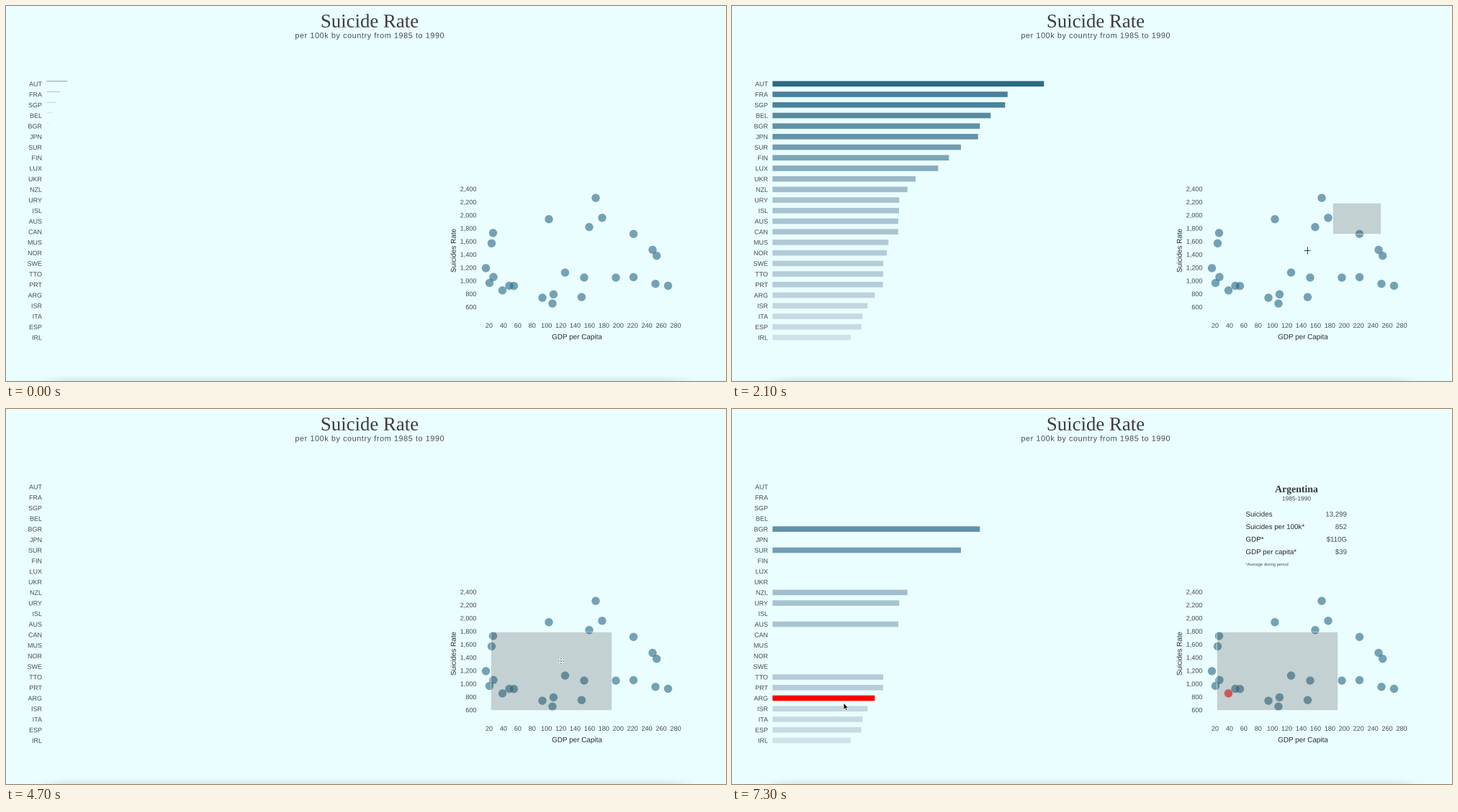
These frames come from a looping animation (1000 px wide and 522 px high, 7400 ms). A matplotlib script:

```python
import numpy as np
import matplotlib.pyplot as plt
from matplotlib.animation import FuncAnimation
from matplotlib.patches import Circle, PathPatch, Rectangle
from matplotlib.path import Path
from matplotlib.textpath import TextPath
from matplotlib.transforms import Affine2D

W, H = 1000, 522
FRAMES, STEP = 74, 100
BG = "#ebfeff"
INK = "#444b4d"
SANS, SERIF = "Liberation Sans", "Liberation Serif"
DEEP = np.array([42, 106, 135]) / 255
PALE = np.array([209, 225, 233]) / 255

# code, GDP per capita, rate
DATA = [
    ("AUT", 168.6, 2262), ("FRA", 177.6, 1959), ("SGP", 103.3, 1938),
    ("BEL", 159.5, 1818), ("BGR", 25.5, 1728), ("JPN", 221.3, 1713),
    ("SUR", 23.5, 1570), ("FIN", 247.9, 1470), ("LUX", 253.6, 1380),
    ("UKR", 15.5, 1192), ("NZL", 125.9, 1124), ("URY", 26, 1056),
    ("ISL", 221.3, 1054), ("AUS", 152.5, 1048), ("CAN", 196.7, 1047),
    ("MUS", 20.5, 966), ("NOR", 251.9, 952), ("SWE", 269.5, 923),
    ("TTO", 48.1, 922), ("PRT", 54.6, 920), ("ARG", 38.6, 852),
    ("ISR", 109.8, 792), ("ITA", 149, 750), ("ESP", 94.3, 740),
    ("IRL", 108.3, 652),
]
DETAILS = {
    "TTO": ("Trinidad and Tobago", "759", "922", "$5.1G", "$48"),
    "PRT": ("Portugal", "5,462", "920", "$51G", "$54"),
    "ARG": ("Argentina", "13,299", "852", "$110G", "$39"),
}
BAR_X, BAR_Y, PITCH, BAR_H = 56.3, 104.5, 14.71, 7.6

# Pointer stops: time, x, y
POINTER = np.array([
    (600, 520, 5), (700, 562, 105), (800, 595, 205), (900, 606.5, 234),
    (1050, 650, 252), (1300, 850, 276), (1500, 906, 270), (1700, 900, 274),
    (2400, 733, 383), (2600, 735, 383), (3000, 835, 343), (4100, 831, 315),
    (4600, 771, 351), (4800, 771, 351), (5100, 715, 356), (5500, 480, 368),
    (5900, 235, 371), (6200, 186.5, 378.5), (6500, 178, 387),
    (6900, 162, 400), (7300, 155, 409),
])
DRAGS = ((1700, 2400), (4100, 4600))


def scale_x(gdp):
    return 671 + (gdp - 20) * 0.9962


def scale_y(rate):
    return 418.9 - (rate - 600) * 0.0913


def smooth(u):
    u = np.clip(u, 0, 1)
    return u * u * (3 - 2 * u)


def cubic(u):
    u = np.clip(u, 0, 1)
    return 4 * u**3 if u < 0.5 else 1 - 4 * (1 - u)**3


def pointer(t):
    for start, end in DRAGS:
        if start < t < end:
            t = start + (end - start) * smooth((t - start) / (end - start))
    return tuple(np.interp(t, POINTER[:, 0], POINTER[:, k]) for k in (1, 2))


def brush(t):
    """Left, top, right, bottom of the selection, or None."""
    if t < 1900:
        return None
    x, y = pointer(min(t - 100, 2400))
    shift = smooth((t - 4100) / 500)
    dx, dy = -60 * shift, 36.3 * shift
    return x + dx, 274 + dy, 900.5 + dx, y + dy


def selected(t):
    x0, y0, x1, y1 = brush(t)
    return [i for i, (_, gdp, rate) in enumerate(DATA)
            if x0 < scale_x(gdp) < x1 and y0 < scale_y(rate) < y1]


fig = plt.figure(figsize=(W / 100, H / 100), dpi=100, facecolor=BG)
ax = fig.add_axes([0, 0, 1, 1])
ax.set_xlim(0, W)
ax.set_ylim(H, 0)
ax.axis("off")


def advance(s, size, prop):
    def right(text):
        return TextPath((0, 0), text, size=size, prop=prop).get_extents().x1
    return right(s + "|") - right("|")


def label(x, y, s, size, anchor=0.5, font=SANS, color=INK, bold=False,
          spacing=0, angle=0):
    """Text as outlines; anchor 0, 0.5 or 1 sets left, middle or right."""
    prop = {"family": font, "weight": "bold" if bold else "normal"}
    width = advance(s, size, prop) + spacing * (len(s) - 1)
    if spacing:
        parts = []
        for i, ch in enumerate(s):
            if ch != " ":
                left = advance(s[:i], size, prop) + spacing * i if i else 0
                parts.append(TextPath((left, 0), ch, size=size, prop=prop))
        path = Path.make_compound_path(*parts)
    else:
        path = TextPath((0, 0), s, size=size, prop=prop)
    place = (Affine2D().translate(-anchor * width, 0).scale(1, -1)
             .rotate_deg(angle).translate(x, y))
    patch = PathPatch(place.transform_path(path), fc=color, lw=0, zorder=2)
    return ax.add_patch(patch)


def shadow():
    y = np.arange(500, H)[:, None] + 0.5
    x = np.arange(W)[None, :] + 0.5
    fall = np.exp(-((H - y) / 5.5)**2)
    sides = smooth((x - 30) / 60) * smooth((970 - x) / 60)
    rgba = np.zeros((H - 500, W, 4))
    rgba[..., 3] = 0.075 * fall * sides
    ax.imshow(rgba, extent=(0, W, H, 500), aspect="auto", zorder=1)
    ax.set_xlim(0, W)
    ax.set_ylim(H, 0)


def static_parts():
    shadow()
    label(505, 29.7, "Suicide Rate", 26.8, font=SERIF, color="#3a3d3f")
    label(505, 44.6, "per 100k by country from 1985 to 1990", 10.8,
          spacing=0.6)
    for i, (code, _, _) in enumerate(DATA):
        label(50, 111.6 + PITCH * i, code, 9, anchor=1)
    for rate in range(600, 2401, 200):
        label(653.5, scale_y(rate) + 3.3, f"{rate:,}", 9.1, anchor=1)
    for gdp in range(20, 281, 20):
        label(scale_x(gdp), 447.8, str(gdp), 9.1)
    label(793, 463.7, "GDP per Capita", 9.9, color="#25292b")
    label(624.7, 340.5, "Suicides Rate", 9.9, color="#25292b", angle=-90)


def detail_card(name, *values):
    dark = "#25292b"
    parts = [
        label(784, 115.9, name, 13.8, font=SERIF, bold=True, color="#333638"),
        label(784, 127.4, "1985-1990", 8.4),
        label(713.5, 218.2, "*Average during period", 5.8, anchor=0),
    ]
    heads = ("Suicides", "Suicides per 100k*", "GDP*", "GDP per capita*")
    for k, (head, value) in enumerate(zip(heads, values)):
        y = 149.6 + 17.5 * k
        parts.append(label(713.5, y, head, 9.8, anchor=0, color=dark))
        parts.append(label(854, y, value, 9.7, anchor=1))
    return parts


def bar_color(rate):
    low, high = DATA[-1][2], DATA[0][2]
    return tuple(PALE + (DEEP - PALE) * (rate - low) / (high - low))


def icon(points, closed, **style):
    path = Path(points, closed=closed)
    return ax.add_patch(PathPatch(path, zorder=6, **style))


def make_icons():
    arrow = [(0, 0), (0, 9.6), (2.2, 7.6), (3.8, 11), (5.4, 10.3), (3.9, 7),
             (6.8, 7), (0, 0)]
    plus = Path([(-4.7, 0), (4.7, 0), (0, -4.7), (0, 4.7)], [1, 2, 1, 2])
    arm = [(0.6, -0.6), (0.6, -3.1), (2, -3.1), (0, -5.2), (-2, -3.1),
           (-0.6, -3.1)]
    move = [(x * c - y * s, x * s + y * c)
            for c, s in ((1, 0), (0, -1), (-1, 0), (0, 1)) for x, y in arm]
    rim = {"fc": "black", "ec": "white", "lw": 0.6}
    cross = PathPatch(plus, fc="none", ec="#333333", lw=0.7, zorder=6)
    return {
        "arrow": icon(arrow, True, **rim),
        "cross": ax.add_patch(cross),
        "move": icon(move + move[:1], True, **rim),
    }


static_parts()
bars, dots = [], []
for i, (_, gdp, rate) in enumerate(DATA):
    bar = Rectangle((BAR_X, BAR_Y + PITCH * i), 0, 0, lw=0, snap=False)
    bars.append(ax.add_patch(bar))
    dot = Circle((scale_x(gdp), scale_y(rate)), 5.7, lw=0, alpha=0.62,
                 zorder=3)
    dots.append(ax.add_patch(dot))
box = ax.add_patch(Rectangle((0, 0), 0, 0, fc=(0.27, 0.27, 0.27, 0.24),
                             ec=(1, 1, 1, 0.7), lw=0.5, zorder=4))
cards = {code: detail_card(*row) for code, row in DETAILS.items()}
icons = make_icons()


def icon_kind(t, x, y, area):
    if t < 600:
        return None
    if not (661 < x < 925 and 250 < y < 430):
        return "arrow"
    inside = area and area[0] < x < area[2] and area[1] < y < area[3]
    return "move" if t >= 2600 and inside else "cross"


def hovered(t, x, y, shown):
    row = int((y - BAR_Y) // PITCH)
    if t < 900 or row not in shown or x < BAR_X:
        return None
    return row if x < BAR_X + DATA[row][2] / 6 else None


def draw(frame):
    t = frame * STEP
    area = brush(t)
    x, y = pointer(t)

    if t < 2700:
        shown, start = list(range(len(DATA))), -268
    else:
        shown, start = selected(2700 if t < 4680 else 4700), 2700
        if t >= 4680:
            start = 4680
    hot = hovered(t, x, y, shown)

    for i, (bar, dot) in enumerate(zip(bars, dots)):
        rate = DATA[i][2]
        grow = 0
        if i in shown:
            grow = cubic((t - start - 25 * shown.index(i)) / 1000)
        bar.set_width(rate / 6 * grow)
        bar.set_height(BAR_H * grow)
        bar.set_facecolor("red" if i == hot else bar_color(rate))
        dot.set_facecolor("red" if i == hot else tuple(DEEP))

    box.set_visible(area is not None)
    if area:
        box.set_bounds(area[0], area[1], area[2] - area[0], area[3] - area[1])

    for code, parts in cards.items():
        for part in parts:
            part.set_visible(hot is not None and DATA[hot][0] == code)

    kind = icon_kind(t, x, y, area)
    for name, patch in icons.items():
        patch.set_visible(name == kind)
        patch.set_transform(Affine2D().translate(x, y) + ax.transData)
    return []


anim = FuncAnimation(fig, draw, frames=FRAMES, interval=STEP, repeat=True,
                     repeat_delay=0, blit=False)
plt.show()
```
